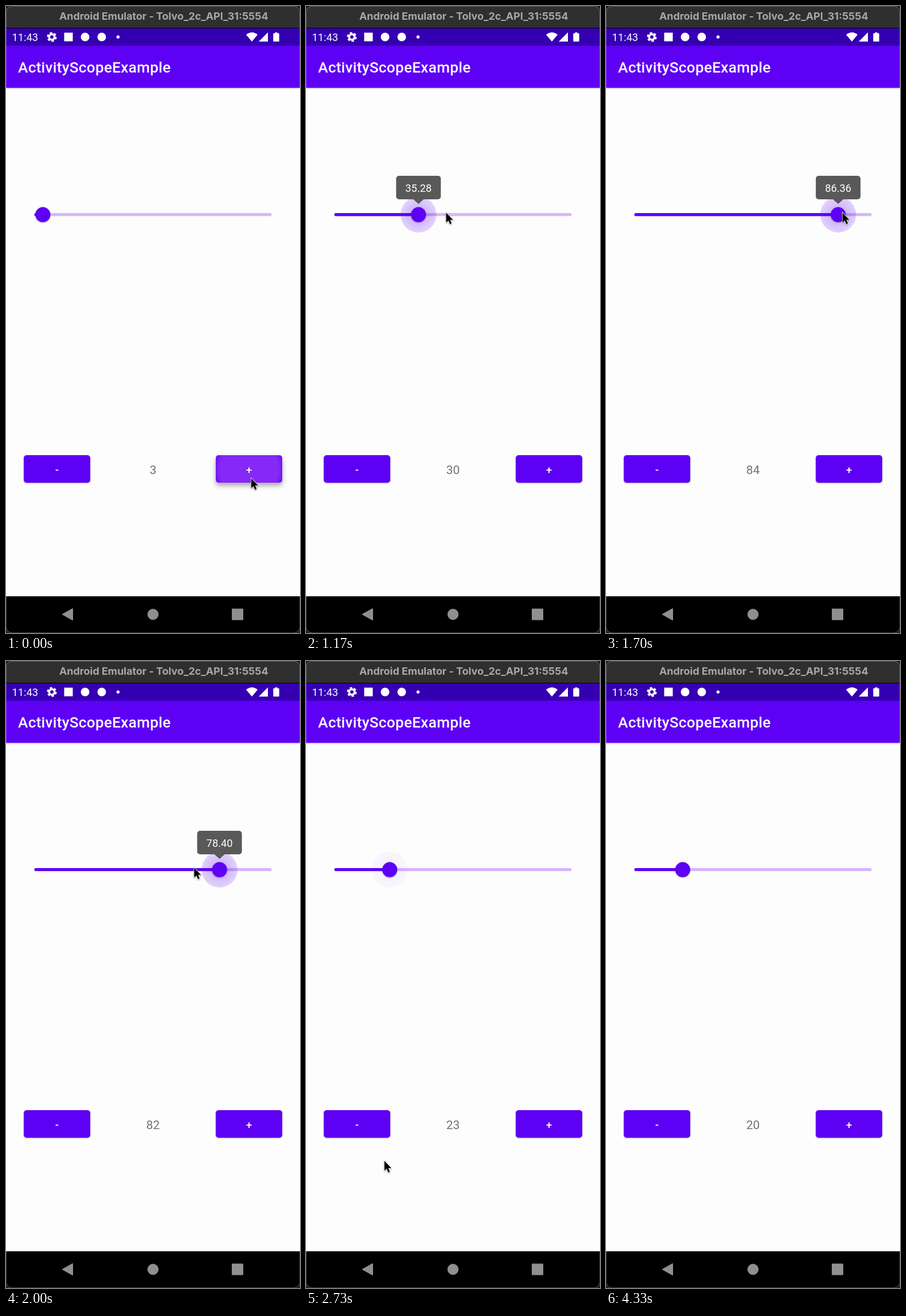
Recreate the animation shown at these times as an HTML page. Size 513 by 1093 pixels, loop 4.63 s.

```html
<!DOCTYPE html>
<html lang="en">
<head>
<meta charset="utf-8">
<title>Slider and counter</title>
<style>
html, body { margin: 0; height: 100%; overflow: hidden; background: #1b1b1b; }
svg { display: block; width: 100%; height: 100%; }
text { font-family: Roboto, sans-serif; fill: #fff; }
.title { font: 700 17.9px Inter, sans-serif; fill: #a8a8a8; }
.app { font-size: 26.13px; font-weight: 500; letter-spacing: .0108em; }
.small { font-size: 18.3px; }
.mid { text-anchor: middle; }
.sign { font-size: 18.3px; font-weight: 500; }
#count { font-size: 20.9px; fill: #727272; }
#cursor { filter: drop-shadow(0 1px 1px rgba(0,0,0,.4)); }
#thumb { filter: drop-shadow(0 1px 1px rgba(0,0,0,.3)); }
.bar { filter: drop-shadow(0 1.5px 1.5px rgba(0,0,0,.22)); }
</style>
</head>
<body>
<svg viewBox="0 0 513 1093" preserveAspectRatio="none">
  <defs>
    <clipPath id="window"><rect width="513" height="1093" rx="10"/></clipPath>
    <clipPath id="face"><rect width="116" height="48" rx="5"/></clipPath>
    <radialGradient id="ripple">
      <stop offset=".74" stop-color="#ffabff" stop-opacity=".24"/>
      <stop offset="1" stop-color="#ffabff" stop-opacity="0"/>
    </radialGradient>
    <radialGradient id="glow">
      <stop offset=".4" stop-color="#5e00f4" stop-opacity=".28"/>
      <stop offset="1" stop-color="#5e00f4" stop-opacity=".17"/>
    </radialGradient>
  </defs>
  <g clip-path="url(#window)">
    <rect width="513" height="1093" fill="#fdfdfd"/>
    <rect class="bar" y="69" width="513" height="73.700" fill="#5e00f4"/>
    <rect y="38" width="513" height="31.300" fill="#3500b2"/>
    <rect width="513" height="39"/>
    <rect width="513" height="38" fill="#2f2f2f"/>
    <text class="title" x="93" y="24">Android Emulator - Tolvo_2c_API_31:5554</text>

    <text class="small" x="10.5" y="60.5">11:43</text>
    <g fill="none" stroke="#fff">
      <circle cx="80" cy="54" r="4.7" stroke-width="3.6"/>
      <circle cx="80" cy="54" r="7.2" stroke-width="2.8" stroke-dasharray="4.2 3.34"/>
    </g>
    <g fill="#fff">
      <rect x="101.5" y="46.5" width="15" height="15"/>
      <circle cx="138" cy="54" r="7.5"/>
      <circle cx="167" cy="54" r="7.5"/>
      <circle cx="195.5" cy="54" r="2.7"/>
      <path d="M429 62L419 50Q429 42 439 50Z"/>
      <path d="M457 46V62H441Z"/>
      <path d="M469.500 46h4v1.500h2a1.200 1.200 0 0 1 1.200 1.200v12a1.200 1.200 0 0 1-1.200 1.200h-8a1.200 1.200 0 0 1-1.200-1.200v-12a1.200 1.200 0 0 1 1.200-1.200h2z"/>
    </g>
    <text class="app" x="21" y="116">ActivityScopeExample</text>

    <rect x="49.500" y="361.100" width="414" height="5.200" rx="2.600" fill="#d6b6fb"/>
    <rect id="active" x="49.500" y="361.100" height="5.200" rx="2.600" fill="#5e00f4"/>
    <g id="knob">
      <circle id="halo" r="31.300" fill="url(#glow)"/>
      <circle id="thumb" r="13.100" fill="#5e00f4"/>
      <g id="bubble">
        <path d="M-34-49H34a5 5 0 0 1 5 5V-13a5 5 0 0 1-5 5H9L0 0L-9-8H-34a5 5 0 0 1-5-5V-44a5 5 0 0 1 5-5z" fill="#595959"/>
        <text id="tip" class="small mid" y="-21.500"></text>
      </g>
    </g>

    <g id="minus" transform="translate(31 783)"></g>
    <g id="plus" transform="translate(366 783)"></g>
    <text id="count" class="mid" x="256.500" y="816"></text>

    <rect y="1029" width="513" height="64"/>
    <g fill="#8f8f8f" stroke="#8f8f8f" stroke-linejoin="round">
      <path d="M99 1060.500L116 1051V1070Z" stroke-width="2"/>
      <circle cx="256.500" cy="1060.500" r="9.200"/>
      <rect x="395" y="1051.500" width="18" height="18" stroke-width="2"/>
    </g>
    <rect x=".5" y=".5" width="512" height="1092" rx="10" fill="none" stroke="#fff" stroke-opacity=".25"/>
  </g>
  <g id="cursor">
    <path transform="translate(.8 1.200) scale(.86)" d="M0 0V20L4.600 16L7.800 23.400L11.200 22L8 14.700H14Z" stroke="#fff" stroke-width="1.800" paint-order="stroke"/>
  </g>
</svg>
<script>
const LOOP = 4630;
const $ = id => document.getElementById(id);
const clamp = v => Math.max(0, Math.min(1, v));
const ramp = (t, from, to) => clamp((t - from) / (to - from));

// Smooth monotone curve through rows of [time, value, ...]
function track(keys, t, col = 1) {
  const last = keys.length - 1;
  if (t <= keys[0][0]) return keys[0][col];
  if (t >= keys[last][0]) return keys[last][col];
  const i = keys.findIndex(k => k[0] > t) - 1;
  const slope = j => (keys[j + 1][col] - keys[j][col]) / (keys[j + 1][0] - keys[j][0]);
  const tangent = j => {
    if (j === 0 || j === last) return 0;
    const a = slope(j - 1), b = slope(j);
    return a * b <= 0 ? 0 : 2 * a * b / (a + b);
  };
  const h = keys[i + 1][0] - keys[i][0], u = (t - keys[i][0]) / h, v = 1 - u;
  return keys[i][col] * (1 + 2 * u) * v * v + tangent(i) * h * u * v * v
       + keys[i + 1][col] * u * u * (3 - 2 * u) - tangent(i + 1) * h * u * u * v;
}

const drag = [
  [900, 5], [1000, 12], [1300, 52.5], [1430, 62.51], [1510, 67.5], [1750, 88],
  [1900, 87], [2000, 78.51], [2080, 67.5], [2300, 38], [2450, 23]
];
const pointer = [
  [0, 427, 822], [440, 427, 822], [620, 38, 355], [690, 39, 356], [880, 72, 359],
  [960, 110, 359], [1220, 267, 359], [1430, 328, 359], [1670, 412, 359],
  [1820, 408, 359], [1900, 373, 359], [2000, 328, 359], [2220, 208, 359],
  [2380, 146, 359], [2500, 141, 362], [2670, 137, 833], [2730, 136, 870],
  [2790, 134, 873], [2900, 134, 873], [3180, 86, 819]
];
const plusClicks = [-30, 200, 430], minusClicks = [3430, 3680, 3900];

function makeButton(id, sign, clicks) {
  const group = $(id);
  group.innerHTML = `<rect width="116" height="48" rx="5" fill="#5e00f4"/>
    <g clip-path="url(#face)">${'<circle cx="58" cy="24" fill="url(#ripple)"/>'.repeat(clicks.length)}</g>
    <text class="sign mid" x="58" y="31.500">${sign}</text>`;
  const face = group.querySelector('rect'), ripples = group.querySelectorAll('circle');
  return t => {
    let lift = 0;
    clicks.forEach((c, i) => {
      const age = t - c + 90;
      lift = Math.max(lift, Math.min(ramp(age, 0, 80), 1 - ramp(age, 160, 240)));
      ripples[i].setAttribute('r', age > 0 ? 14 + age * .45 : 0);
      ripples[i].setAttribute('opacity', 1 - ramp(t, c + 230, c + 350));
    });
    face.style.filter =
      `drop-shadow(0 ${1.3 + 4 * lift}px ${1.2 + 3 * lift}px rgba(0,0,0,.33))`;
  };
}
const buttons = [makeButton('minus', '-', minusClicks), makeButton('plus', '+', plusClicks)];

function valueAt(t) {
  const done = clicks => clicks.filter(c => c <= t).length;
  if (t < 900) return 2 + done(plusClicks);
  return track(drag, t) - done(minusClicks);
}

function draw(t) {
  const value = valueAt(t), x = 52.06 + 4.088 * value;
  $('active').setAttribute('width', x - 49.5);
  $('knob').setAttribute('transform', `translate(${x} 363.7)`);
  $('halo').setAttribute('opacity', ramp(t, 900, 1000) * (1 - ramp(t, 2500, 2780)));
  const pop = ramp(t, 920, 1000) * (1 - ramp(t, 2470, 2590));
  $('bubble').setAttribute('transform', `translate(0 -18.7) scale(${pop})`);
  $('bubble').setAttribute('opacity', pop);
  $('tip').textContent = value.toFixed(2);
  $('count').textContent = Math.round(t > 900 && t < 2500 ? valueAt(t - 33) : value);
  buttons.forEach(update => update(t));
  $('cursor').setAttribute('transform',
    `translate(${track(pointer, t)} ${track(pointer, t, 2)})`);
  $('cursor').setAttribute('visibility', t < 4240 ? 'visible' : 'hidden');
}

const start = performance.now();
function tick() {
  draw((performance.now() - start) % LOOP);
  requestAnimationFrame(tick);
}
tick();
</script>
</body>
</html>
```
